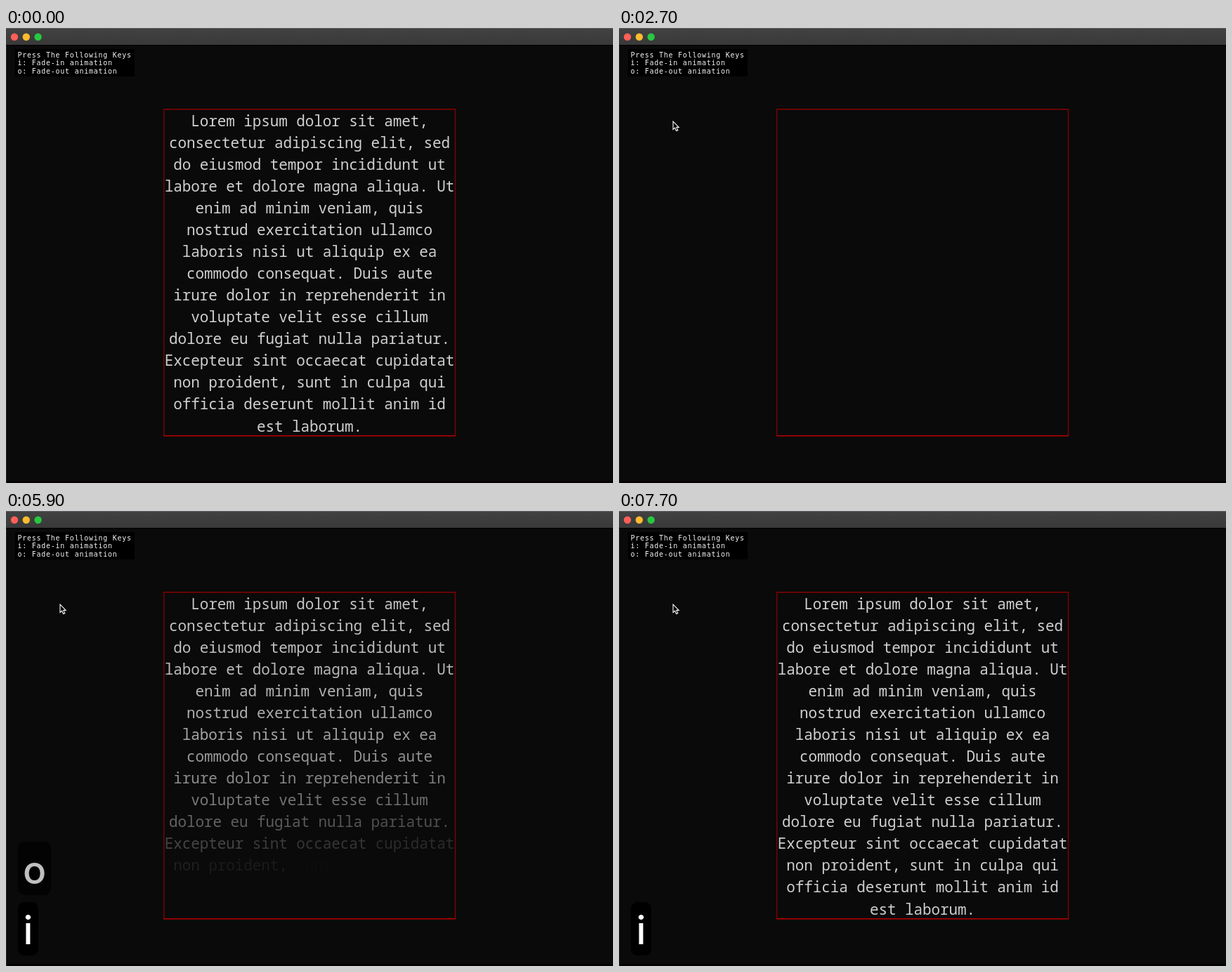
An HTML page with a canvas for the animation above (7.81 s loop, 864 px wide and 648 px high).

```html
<!DOCTYPE html>
<html lang="en">
<head>
<meta charset="utf-8">
<title>Text fade</title>
<style>
html, body { margin: 0; width: 100%; height: 100%; overflow: hidden; background: #0a0a0a; }
canvas { display: block; }
</style>
</head>
<body>
<canvas id="stage" width="864" height="648"></canvas>
<script>
const ctx = document.getElementById('stage').getContext('2d');
const LOOP = 7810, STEP = 100, ADVANCE = 12.5, LINE_HEIGHT = 31.05;

const lines = `Lorem ipsum dolor sit amet,
consectetur adipiscing elit, sed
do eiusmod tempor incididunt ut
labore et dolore magna aliqua. Ut
enim ad minim veniam, quis
nostrud exercitation ullamco
laboris nisi ut aliquip ex ea
commodo consequat. Duis aute
irure dolor in reprehenderit in
voluptate velit esse cillum
dolore eu fugiat nulla pariatur.
Excepteur sint occaecat cupidatat
non proident, sunt in culpa qui
officia deserunt mollit anim id
est laborum.`.split('\n');

// Each word starts fading `lag` ms per line after the fade's start
const fades = [
  { start: 50, to: 0, lag: 135, tau: 140 },
  { start: 3410, to: 1, lag: 12, tau: 50, key: 'i' },
  { start: 5000, to: 0, lag: 12, tau: 90, key: 'o' },
  { start: 5750, to: 1, lag: 12, tau: 50, key: 'i' },
  { start: 6408, to: 0, lag: 12, tau: 90, key: 'o' },
  { start: 7310, to: 1, lag: 12, tau: 50, key: 'i' }
];

// time, x, y of the pointer tip
const pointerPath = [
  [800, 820, 4], [1000, 752, 20], [1600, 410, 15], [2000, 170, 10],
  [2400, 26, 18], [2500, 15, 50], [2600, 50, 112], [2700, 77, 133]
];

function rect(x, y, w, h, color) {
  ctx.fillStyle = color;
  ctx.fillRect(x, y, w, h);
}

function write(text, x, y, font, color, spacing = 0) {
  ctx.font = font;
  ctx.letterSpacing = spacing + 'px';
  ctx.fillStyle = color;
  ctx.fillText(text, x, y);
}

function drawWindow() {
  rect(0, 0, 864, 648, '#0a0a0a');
  rect(0, 645, 864, 3, '#050002');
  rect(0, 24, 1, 624, '#222');
  const bar = ctx.createLinearGradient(0, 0, 0, 24);
  bar.addColorStop(0, '#424242');
  bar.addColorStop(1, '#393939');
  rect(0, 0, 864, 24, bar);
  rect(0, 0, 864, 1, '#5a6066');
  rect(0, 24, 864, 1, '#000');
  ['#ff5f57', '#febc2e', '#28c840'].forEach((color, i) => {
    ctx.fillStyle = color;
    ctx.beginPath();
    ctx.arc(12 + 16.8 * i, 12.8, 5.2, 0, 7);
    ctx.fill();
  });
  rect(13, 30, 170, 39, '#000');
  ['Press The Following Keys', 'i: Fade-in animation', 'o: Fade-out animation'].forEach((text, i) =>
    write(text, 16.5, 41.5 + 11.5 * i, '10px "DejaVu Sans Mono", monospace', '#f4f4f4', 0.74));
}

function wordAlpha(t, row) {
  let alpha = 1;
  for (const { start, to, lag, tau } of fades) {
    const age = t - start - row * lag;
    if (age > 0) alpha = to + (alpha - to) * Math.exp(-age / tau);
  }
  return alpha < 0.012 ? 0 : alpha;
}

function drawText(t) {
  lines.forEach((line, i) => {
    const left = 432 - line.length * ADVANCE / 2;
    for (const { 0: word, index } of line.matchAll(/\S+/g)) {
      ctx.globalAlpha = wordAlpha(t, i + index / 33);
      write(word, left + index * ADVANCE, 139.8 + i * LINE_HEIGHT,
        '21px "Noto Sans Mono", monospace', '#d0d0d0', -0.1);
    }
  });
  ctx.globalAlpha = 1;
  rect(224, 115, 416, 1.4, '#900000');
  rect(224, 115, 1.4, 466, '#800000');
  rect(638.8, 115, 1.4, 466, '#800000');
  rect(224, 580, 416, 1.6, '#b00000');
}

// Newest key at the bottom, earlier ones pushed up; each holds, then fades
function drawKeys(t) {
  const pressed = fades.filter(f => f.key && f.start <= t).reverse();
  pressed.forEach(({ start, key }, slot) => {
    const alpha = Math.min(1, 1 - (t - start - 800) / 400);
    if (alpha <= 0) return;
    const y = 557 - 86 * slot, width = key === 'i' ? 29 : 47;
    ctx.globalAlpha = alpha;
    ctx.fillStyle = '#000';
    ctx.beginPath();
    ctx.roundRect(17, y, width, 76, 9);
    ctx.fill();
    ctx.textAlign = 'center';
    write(key, 17 + width / 2, y + 60, '500 55px Inter, sans-serif', '#fff');
    ctx.textAlign = 'left';
  });
  ctx.globalAlpha = 1;
}

function drawPointer(t) {
  if (t < pointerPath[0][0]) return;
  let [, x, y] = pointerPath.at(-1);
  const next = pointerPath.findIndex(p => p[0] > t);
  if (next > 0) {
    const [t0, x0, y0] = pointerPath[next - 1], [t1, x1, y1] = pointerPath[next];
    const k = (t - t0) / (t1 - t0);
    x = x0 + (x1 - x0) * k;
    y = y0 + (y1 - y0) * k;
  }
  ctx.save();
  ctx.translate(x, y);
  const arrow = new Path2D('M0 0V11.5L2.6 9.2L4.6 13.6L6.7 12.7L4.8 8.4H8.2Z');
  ctx.fillStyle = '#000';
  ctx.fill(arrow);
  ctx.strokeStyle = '#fff';
  ctx.lineWidth = 1.1;
  ctx.stroke(arrow);
  ctx.restore();
}

const origin = performance.now();

function frame() {
  const elapsed = (performance.now() - origin) % LOOP;
  const t = Math.min(LOOP - 110, Math.floor(elapsed / STEP) * STEP);
  drawWindow();
  drawText(t);
  drawKeys(t);
  drawPointer(t);
  requestAnimationFrame(frame);
}
frame();
</script>
</body>
</html>
```
